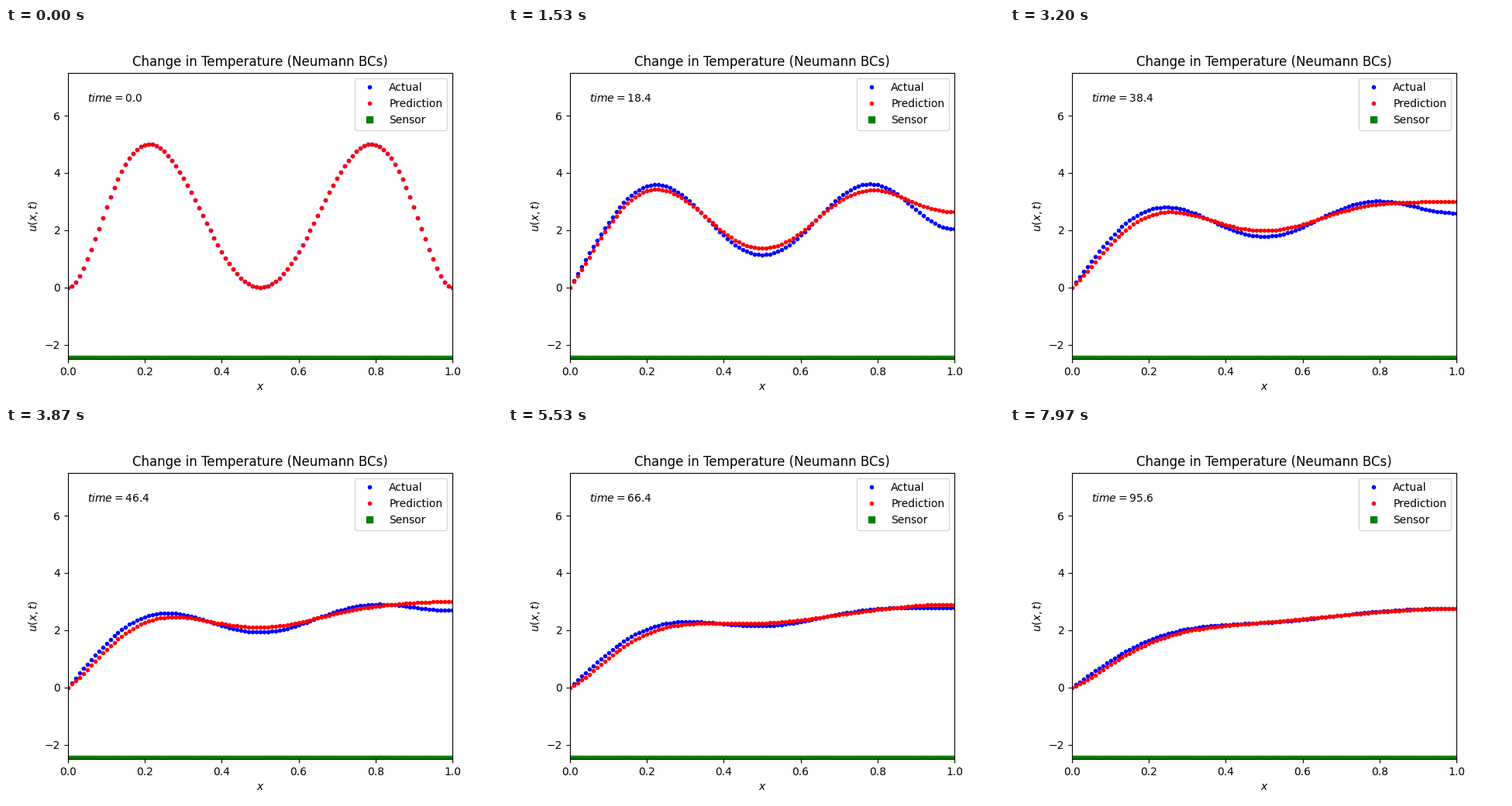
A matplotlib script for the animation above (8000 ms loop, 640x480 px).

```python
import numpy as np
import matplotlib.pyplot as plt
from matplotlib.animation import FuncAnimation

LOOP = 8000       # ms
STEPS = 240       # simulation steps in one loop
TICKS = 320       # drawn frames, each showing the nearest step
DT = 0.4          # simulated time per step

x = np.linspace(0, 1, 101)

# Heat modes with u = 0 at the left end and no flux at the right
fine = np.linspace(0, 1, 4001)
freq = (np.arange(80) + 0.5) * np.pi
start = 2160 * (fine * (1 - fine) * (fine - 0.5))**2
coef = 2 * np.sin(np.outer(freq, fine)) @ start / (len(fine) - 1)
shapes = np.sin(np.outer(freq, x))


def heat(alpha, t):
    return (coef * np.exp(-alpha * freq**2 * t)) @ shapes


def bump(center, width):
    return np.exp(-((x - center) / width)**2)


def actual(t):
    return heat(3.0e-4, t)


def prediction(t):
    """Faster diffusion plus the model's errors near both ends."""
    left = 0.12 * bump(0.2 + 0.0005 * t, 0.1 + 0.0005 * t) - 3 * x * bump(0, 0.06)
    right = 0.42 * np.exp(-(t / 62)**2) * bump(1, 0.1 + 0.0013 * t)
    grow = 1 - np.exp(-t / 6)
    return heat(3.9e-4, t) + grow * (left + right)


fig, ax = plt.subplots(figsize=(6.4, 4.8), dpi=100)
ax.set(xlim=(0, 1), ylim=(-2.5, 7.5), xlabel="$x$", ylabel="$u(x,t)$",
       title="Change in Temperature (Neumann BCs)")
blue, = ax.plot(x, actual(0), "b.", label="Actual")
red, = ax.plot(x, prediction(0), "r.", label="Prediction")
ax.plot(x, np.full_like(x, -2.5), "gs", label="Sensor")
clock = ax.text(0.05, 6.5, "")
ax.legend(loc="upper right")


def draw(i):
    t = int(i * STEPS / TICKS + 0.5) * DT
    blue.set_ydata(actual(t))
    red.set_ydata(prediction(t))
    clock.set_text(f"$time = {t:.1f}$")
    return blue, red, clock


anim = FuncAnimation(fig, draw, frames=TICKS, interval=LOOP / TICKS,
                     repeat=True, repeat_delay=0)
plt.show()
```
